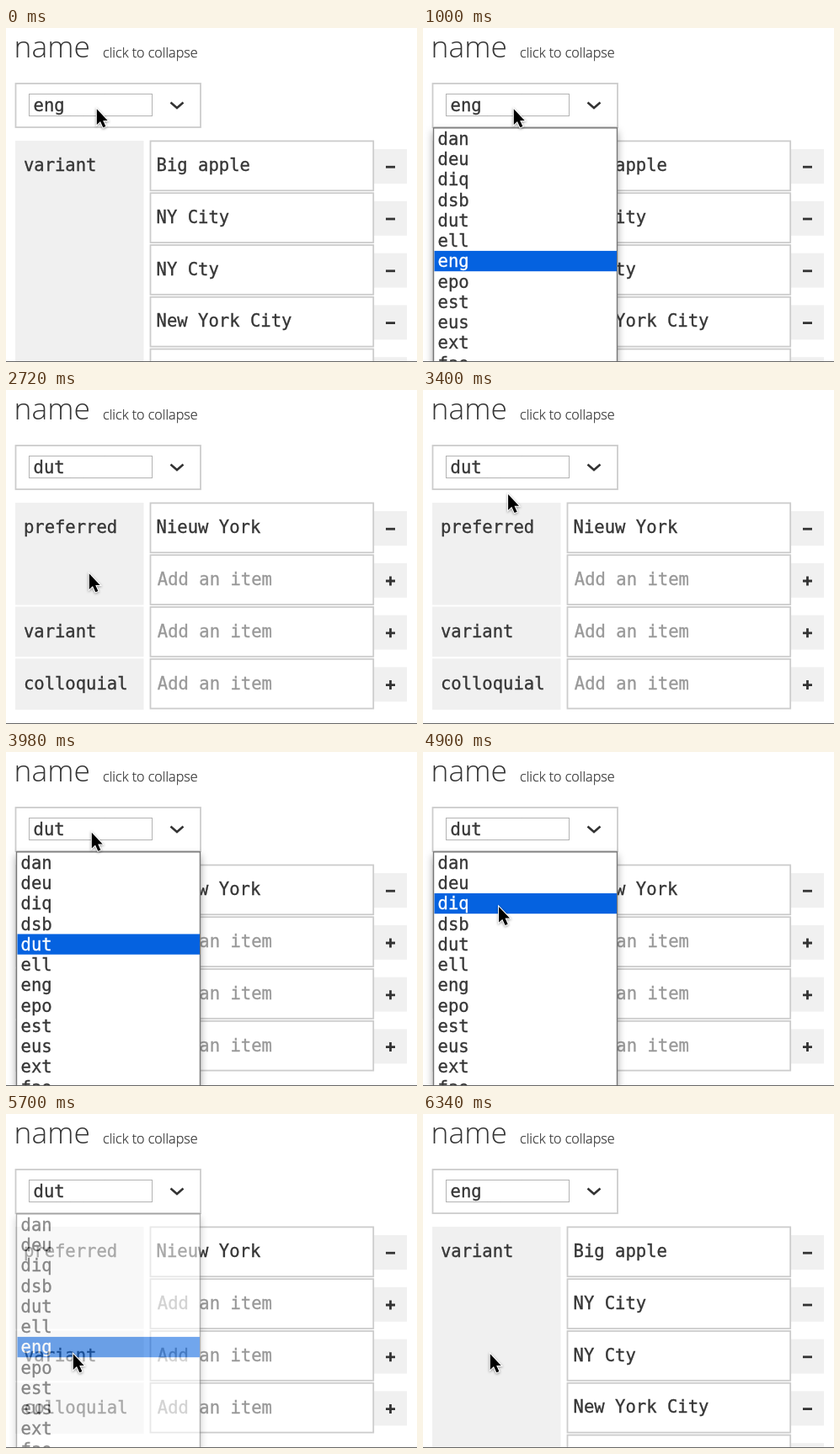
Recreate the animation shown at these times as an HTML page. Size 488x397 px, loop 6.36 s.

```html
<!DOCTYPE html>
<html lang="en">
<head>
<meta charset="utf-8">
<title>Language select</title>
<style>
  html, body { margin: 0; width: 100%; height: 100%; overflow: hidden; background: #fff; }
  svg { display: block; width: 488px; height: 397px; }
  text {
    font: 20.55px "DejaVu Sans Mono", monospace;
    color: #363636; fill: currentColor; stroke: currentColor; stroke-width: .35;
  }
  .heading { font: 300 35.4px "Open Sans", sans-serif; stroke: none; }
  .hint { font: 300 16.15px "Open Sans", sans-serif; stroke-width: .25; }
  .hollow { fill: #fff; stroke: #ccc; stroke-width: 1.8; }
  .panel { fill: #f0f0f0; }
  .empty { color: #999; }
  .sign { fill: none; stroke: #333; stroke-width: 2.8; }
  #menu { filter: drop-shadow(0 5px 5px rgba(0, 0, 0, .35)); }
  #cursor { filter: drop-shadow(0 1.5px 1.5px rgba(0, 0, 0, .4)); }
</style>
</head>
<body>
<svg viewBox="0 0 488 397">
  <text class="heading" x="9.6" y="35">name</text>
  <text class="hint" x="115" y="34.8">click to collapse</text>

  <rect class="hollow" x="11.5" y="66" width="219.5" height="52"/>
  <rect x="27.5" y="78.5" width="146" height="26" fill="none" stroke="#666" stroke-dasharray="1 1"/>
  <path d="M195.5 88.5l7.5 6.5 7.5-6.5" fill="none" stroke="#333" stroke-width="2.6"/>
  <text id="value" x="32.6" y="98.7"></text>

  <g id="eng"></g>
  <g id="dut"></g>

  <g id="menu">
    <rect x="12.5" y="118.8" width="218" height="300" fill="#fff" stroke="#777" stroke-width="1.4"/>
    <rect id="bar" x="13.5" width="216.5" height="24.3" fill="#0562e0"/>
    <g id="items"></g>
  </g>
  <rect y="396" width="488" height="1" fill="#666"/>
  <path id="cursor" d="M0 0V18.6L4.2 14.8 7.5 22 10.6 20.6 7.4 13.6H12.9Z"
        fill="#000" stroke="#fff" stroke-width="2" paint-order="stroke"/>
</svg>
<script>
const LOOP = 6360;
const CODES = ["dan", "deu", "diq", "dsb", "dut", "ell", "eng", "epo", "est", "eus", "ext", "fao"];
const MENU_TOP = 119.4, ITEM = 24.25, ROW = 61.8;
const $ = id => document.getElementById(id);

function add(parent, tag, attrs, text = "") {
  const node = document.createElementNS("http://www.w3.org/2000/svg", tag);
  for (const key in attrs) node.setAttribute(key, attrs[key]);
  node.textContent = text;
  parent.append(node);
  return node;
}

function panel(form, y, height, label) {
  add(form, "rect", { class: "panel", x: 11, y, width: 152.5, height });
  add(form, "text", { x: 20.9, y: y + 36.2 }, label);
}

// A missing value gives an empty field with a plus button.
function field(form, row, value) {
  const y = 134 + row * ROW, mid = y + 31.2;
  add(form, "rect", { class: "panel", x: 437, y: y + 10, width: 39, height: 41 });
  add(form, "rect", { class: "hollow", x: 171.5, y: y + .4, width: 264.7, height: 58.8 });
  add(form, "text", value ? { x: 178.6, y: y + 36 } : { x: 179.8, y: y + 36.4, class: "empty" },
    value || "Add an item");
  add(form, "path", { class: "sign", d: `M451 ${mid}h11` + (value ? "" : `M456.5 ${mid - 5.5}v11`) });
}

panel($("eng"), 134, 270, "variant");
["Big apple", "NY City", "NY Cty", "New York City", " "].forEach((name, i) => field($("eng"), i, name));

panel($("dut"), 134, 121.5, "preferred");
panel($("dut"), 257.5, 59.5, "variant");
panel($("dut"), 319.3, 60.7, "colloquial");
["Nieuw York", "", "", ""].forEach((name, i) => field($("dut"), i, name));

const items = CODES.map((code, i) =>
  add($("items"), "text", { x: 17.6, y: 138.8 + i * ITEM }, code));

// Pointer stops: time, x, y
const PATH = [
  [0, 107.8, 96.3], [1200, 107.8, 96.3], [1720, 98.8, 218.3], [2740, 98.8, 218.3],
  [3700, 101.8, 95.8], [4540, 101.8, 95.8], [5140, 83.8, 231.3], [5200, 83.8, 231.3],
  [5520, 79.8, 285.3], [LOOP, 79.8, 285.3]
];

function pointer(t) {
  const i = PATH.findIndex(stop => stop[0] > t);
  const [t0, x0, y0] = PATH[i - 1], [t1, x1, y1] = PATH[i];
  const p = (t - t0) / (t1 - t0), k = p * p * (3 - 2 * p);
  return [x0 + (x1 - x0) * k, y0 + (y1 - y0) * k];
}

// The menu opens at once and fades out briefly.
function opacity(t, open, close) {
  return t < open ? 0 : Math.max(0, Math.min(1, 1 - (t - close) / 140));
}

function draw(t) {
  const [x, y] = pointer(t);
  const value = t >= 2420 && t < 5840 ? "dut" : "eng";
  const hovered = Math.floor((y - MENU_TOP) / ITEM);
  const active = hovered >= 0 ? hovered : CODES.indexOf(value);

  $("value").textContent = value;
  $("eng").style.display = value === "eng" ? "" : "none";
  $("dut").style.display = value === "dut" ? "" : "none";
  $("menu").style.opacity = t < 3000 ? opacity(t, 400, 2240) : opacity(t, 3900, 5640);
  $("bar").setAttribute("y", MENU_TOP + active * ITEM);
  items.forEach((item, i) => item.style.color = i === active ? "#fff" : "");
  $("cursor").setAttribute("transform", `translate(${x} ${y})`);
}

const start = performance.now();
function tick() {
  draw((performance.now() - start) % LOOP);
  requestAnimationFrame(tick);
}
tick();
</script>
</body>
</html>
```
